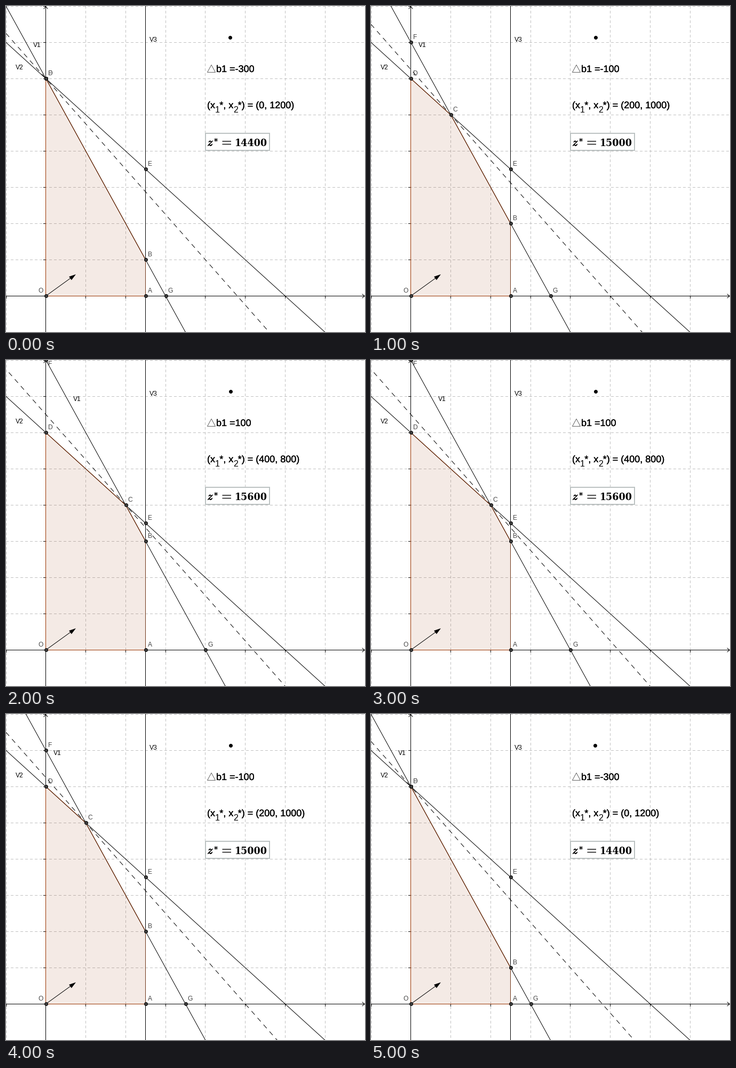
A matplotlib script for the animation above (5.5 s loop, 673x612 px).

```python
import matplotlib
import matplotlib.pyplot as plt
import matplotlib.patheffects as pe
from matplotlib.animation import FuncAnimation
from matplotlib.patches import Polygon, Rectangle

matplotlib.rcParams["font.family"] = "Liberation Sans"
matplotlib.rcParams["mathtext.fontset"] = "cm"
matplotlib.rcParams["toolbar"] = "None"
matplotlib.rcParams["path.snap"] = False

W, H = 673, 612
DPI = 72  # one point equals one pixel
X0, Y0 = 74.9, 544.5
SX, SY = 0.3738, 0.34
BROWN, DARK, GRID = "#993300", "#404040", "#c0c0c0"
STEPS = [-300, -200, -100, 0, 100, 200, 100, 0, -100, -200, -300]

fig = plt.figure(figsize=((W + 0.001) / DPI, (H + 0.001) / DPI), dpi=DPI, facecolor="white")
ax = fig.add_axes([0, 0, 1, 1])
ax.set_xlim(0, W)
ax.set_ylim(H, 0)
ax.axis("off")


def px(x, y):
    return X0 + SX * x, Y0 - SY * y


def snap(v):
    """Centre of the pixel that holds v."""
    return int(v + 1e-6) + 0.5


def line(pts=((0, 0), (0, 0)), color="black", lw=1, z=3, **kw):
    xs, ys = zip(*pts)
    return ax.plot(xs, ys, color=color, lw=lw, zorder=z, **kw)[0]


def move(artist, *pts):
    artist.set_data(*zip(*pts))


def slanted(slope, y_int):
    """End points, in pixels, of y = y_int + slope * x across the stage."""
    xs = (-X0 / SX, (W - X0) / SX)
    return [px(x, y_int + slope * x) for x in xs]


def label(s, x=0, y=0, size=12, color=DARK, stroke=0, z=8, **kw):
    t = ax.text(x, y, s, size=size, color=color, zorder=z,
                va=kw.pop("va", "baseline"), **kw)
    if stroke:
        t.set_path_effects([pe.withStroke(linewidth=stroke, foreground=color)])
    return t


xo = snap(X0)
xa = snap(px(500, 0)[0])

# grid
dash = dict(dashes=(5, 4), dash_capstyle="butt")
for k in range(-1, 8):
    if k:
        gx = snap(px(200 * k, 0)[0])
        line([(gx, 0), (gx, H)], GRID, z=1, **dash)
        line([(gx, Y0), (gx, Y0 + 4)], z=2)
for k in range(1, 9):
    gy = snap(px(0, 200 * k)[1])
    line([(0, gy), (W, gy)], GRID, z=1, **dash)
    line([(xo - 4, gy), (xo, gy)], z=2)

# axes
line([(xo, 0), (xo, H)], z=2)
line([(0, Y0), (W, Y0)], z=2)
line([(xo - 3.5, 5), (xo, 1), (xo + 3.5, 5)], z=2)
line([(W - 5, Y0 - 3.5), (W - 1, Y0), (W - 5, Y0 + 3.5)], z=2)

# feasible region and constraints
region = ax.add_patch(Polygon([(0, 0)] * 3, fc=BROWN, ec="none", alpha=0.1, zorder=1.5))
v1, goal = line(), line()
line(slanted(-1, 1200))
line([(xa, 0), (xa, H)])
edge = line(color="#7a2900", z=4)
edge_ab = line(color="#6e3416", z=4)
line([(xo, px(0, 1200)[1]), (xo, Y0), (xa, Y0)], BROWN, z=4)

# gradient vector
tip = px(150, 120)
dx, dy = tip[0] - xo, tip[1] - Y0
n = (dx * dx + dy * dy) ** 0.5
ux, uy = dx / n, dy / n
bx, by = tip[0] - 13 * ux, tip[1] - 13 * uy
line([(xo, Y0), (bx, by)], z=5)
ax.add_patch(Polygon([tip, (bx - 4 * uy, by + 4 * ux), (bx + 4 * uy, by - 4 * ux)],
                     fc="black", ec="none", zorder=5))

# named points
dots = {c: line([(0, 0)], z=6, marker="o", ms=6, mfc=DARK, mec="black", mew=1)
        for c in "OABCDEFG"}
names = {c: label(c) for c in dots}
label("V2", 17.5, 119, color="black")
label("V3", 268.5, 67, color="black")
v1_name = label("V1", 0, 77, color="black")
slider = line([(0, 0)], z=6, marker="o", ms=7, mec="none")

# read-outs
ax.add_patch(Polygon([(377.5, 124.5), (392.5, 124.5), (385, 110.5)],
                     fc="none", ec=DARK, lw=0.8, zorder=8))
big = dict(size=18, color="black", stroke=0.3)
delta = label("", 394, 124, **big)
label("(x", 377, 192, **big)
label("1", 392, 200, 16, "black")
label("*, x", 400.3, 192, **big)
label("2", 426, 200, 16, "black")
optimum = label("", 434.7, 192, **big)

ax.add_patch(Rectangle((374, 239), 120, 32, fc="white", ec="#bcc2c2", lw=2, zorder=7))
label("$z$", 377.5, 262.5, 21, "black", 0.8)
label(r"$\ast$", 394, 251, 16, "black", 0.3, ha="center", va="center")
for y in (254, 259.5):
    line([(405.5, y), (422, y)], lw=1.4, z=8, solid_capstyle="butt")
value = label("", 428.5, 262.5, 17.5, "black", family="DejaVu Serif", weight="bold")


def update(i):
    db = STEPS[i]
    top = 1500 + db
    x, y = 300 + db, 900 - db
    z = 15 * x + 12 * y
    spots = dict(O=(0, 0), A=(500, 0), B=(500, top - 1000), C=(x, y),
                 D=(0, 1200), E=(500, 700), F=(0, top), G=(top / 2, 0))
    for c, p in spots.items():
        qx, qy = px(*p)
        on = qy > -5
        move(dots[c], (snap(qx), snap(qy)))
        dots[c].set_visible(on)
        names[c].set_position((qx + (-15 if c == "O" else 4), max(qy - 6.5, 11)))
        names[c].set_visible(on and not (c == "C" and x == 0))

    b, c, d = (px(*spots[k]) for k in "BCD")
    region.set_xy([(xo, Y0), (xa, Y0), b, c, d])
    move(edge, b, c, d)
    move(edge_ab, (xa, Y0), (xa, b[1]))
    move(v1, *slanted(-2, top))
    move(goal, *slanted(-1.25, z / 12))
    goal.set_linestyle((9 if db > 0 else 0, (9, 8)))
    v1_name.set_x(51.3 + SX / 2 * (db + 300))
    move(slider, (420.4 + 0.002 * (db + 300), 59.5))

    delta.set_text(f"b1 ={db}")
    optimum.set_text(f"*) = ({x}, {y})")
    value.set_text(str(z))
    return []


anim = FuncAnimation(fig, update, frames=len(STEPS), interval=500,
                     repeat=True, repeat_delay=0, blit=False)
plt.show()
```
